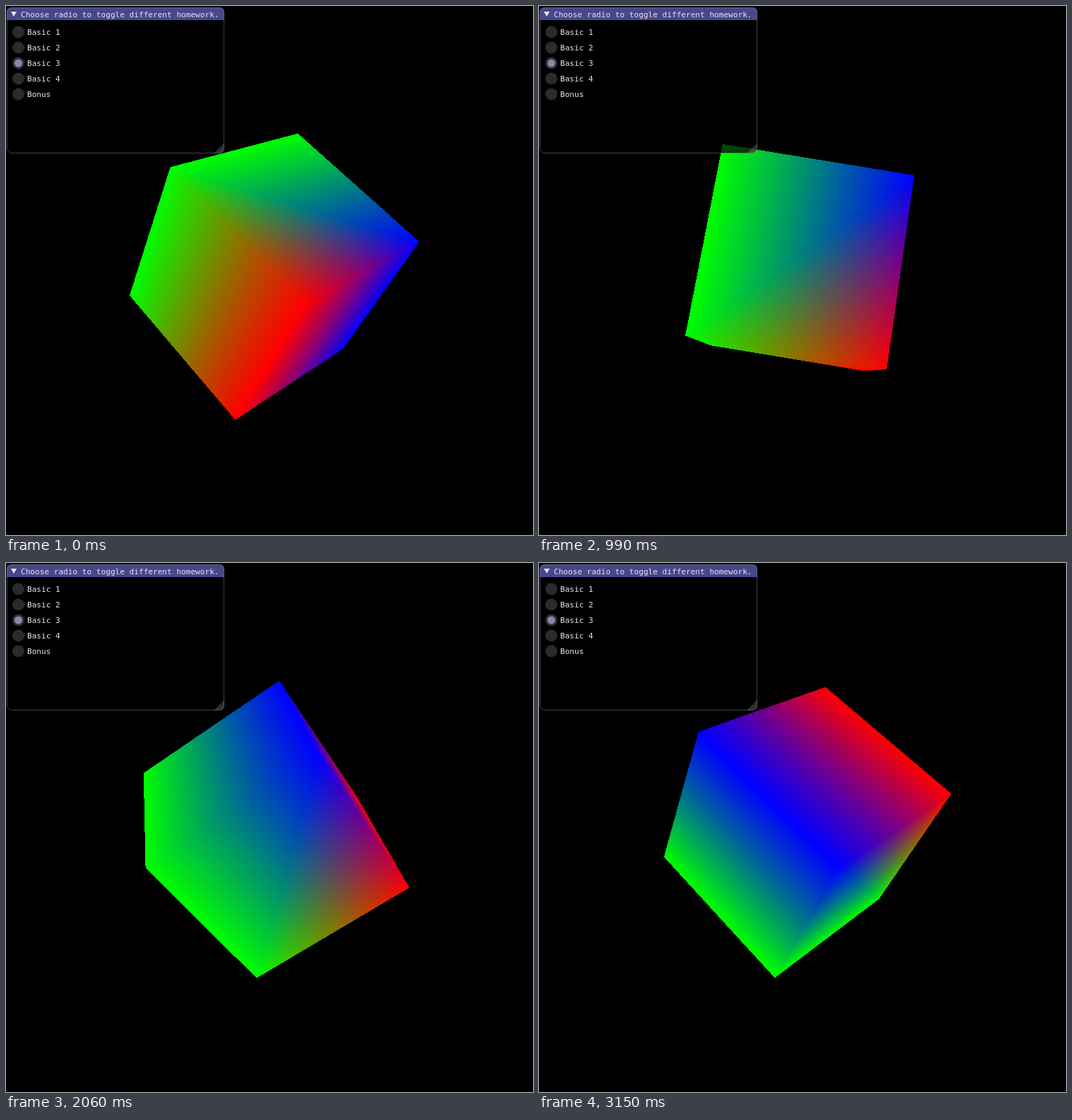
Write an HTML page with a canvas that moves like this. It is 746 px wide and 750 px high and loops after 3.23 s.

```html
<!DOCTYPE html>
<html lang="en">
<head>
<meta charset="utf-8">
<title>Rotating colour cube</title>
<style>
  html, body { margin: 0; width: 100%; height: 100%; overflow: hidden; background: #000; }
  canvas, svg { position: absolute; left: 0; top: 0; }
  text { font: 11.1px "DejaVu Sans Mono", monospace; fill: #e6e6e6; white-space: pre; }
</style>
</head>
<body>
<canvas id="stage" width="746" height="750"></canvas>
<svg id="panel" width="310" height="211">
  <rect x="1.5" y="2.5" width="307" height="206" rx="7" fill="#000" fill-opacity=".72"/>
  <path d="M1 20V9Q1 2 8 2H302Q309 2 309 9V20Z" fill="#47478c"/>
  <path d="M309 194V202Q309 209 302 209H294Z" fill="#fff" fill-opacity=".18"/>
  <rect x="1.5" y="2.5" width="307" height="206" rx="7" fill="none" stroke="#808080" stroke-opacity=".5"/>
  <path d="M7 8H15L11 15Z" fill="#e6e6e6"/>
  <text x="21" y="15.5">Choose radio to toggle different homework.</text>
</svg>
<script>
const W = 746, H = 750, LOOP = 3230, FRAMES = 42;
const ctx = document.getElementById('stage').getContext('2d');
const panel = document.getElementById('panel');

['Basic 1', 'Basic 2', 'Basic 3', 'Basic 4', 'Bonus'].forEach((label, i) => {
  const y = 37 + 22 * i, on = i === 2;
  panel.insertAdjacentHTML('beforeend',
    `<circle cx="17.5" cy="${y}" r="8.5" fill="${on ? '#2f2f3a' : '#2b2b2b'}"/>` +
    (on ? `<circle cx="17.5" cy="${y}" r="5.6" fill="#8b87a3"/>` : '') +
    `<text x="30" y="${y + 4}">${label}</text>`);
});

const corners = {
  A: [-1, -1, 1], B: [-1, -1, -1], C: [1, -1, -1], D: [1, -1, 1],
  E: [-1, 1, 1], F: [1, 1, 1], G: [1, 1, -1], H: [-1, 1, -1]
};
// Clockwise as seen from outside; each is split along its first-third diagonal.
const faces = ['AEFD', 'ADCB', 'DFGC', 'EHGF'];

// Step number and angle in radians
const keys = [[0, -1.255], [9, -.557], [13, -.2325], [19, .2325], [27, .848], [31, 1.163], [41, 1.945]];

function angleAt(step) {
  const i = Math.max(1, keys.findIndex(k => k[0] >= step));
  const [s0, a0] = keys[i - 1], [s1, a1] = keys[i];
  return a0 + (a1 - a0) * (step - s0) / (s1 - s0);
}

const startOf = step => Math.floor((step * 76.66 + (step > 28 ? 10.5 : 0)) / 10) * 10;

function stepAt(ms) {
  let step = FRAMES - 1;
  while (startOf(step) > ms) step--;
  return step;
}

// Turns a corner about the axis (1, 0, 1) and projects it.
function project([x, y, z], angle) {
  const c = Math.cos(angle), s = Math.sin(angle) * Math.SQRT1_2;
  const along = (x + z) / 2 * (1 - c);
  const scale = 918 / (7.5 - (z * c + y * s + along));
  return {
    x: 371 + (x * c - y * s + along) * scale,
    y: 374 - (y * c + (x - z) * s) * scale,
    w: scale,
    channel: x < 0 ? 1 : y < 0 ? 0 : 2
  };
}

const cross = (a, b, x, y) => (b.x - a.x) * (y - a.y) - (b.y - a.y) * (x - a.x);

// Fills a triangle with perspective-correct blending of its corner colours.
function fillTriangle(data, a, b, c) {
  if (cross(a, b, c.x, c.y) <= 0) return;
  const xs = [a.x, b.x, c.x], ys = [a.y, b.y, c.y];
  const left = Math.floor(Math.min(...xs)), right = Math.ceil(Math.max(...xs));
  const top = Math.floor(Math.min(...ys)), bottom = Math.ceil(Math.max(...ys));
  for (let y = top; y < bottom; y++) {
    for (let x = left; x < right; x++) {
      const px = x + .5, py = y + .5;
      let u = cross(b, c, px, py), v = cross(c, a, px, py), w = cross(a, b, px, py);
      if (u < 0 || v < 0 || w < 0) continue;
      u *= a.w; v *= b.w; w *= c.w;
      const unit = 255 / (u + v + w), rgb = [0, 0, 0];
      rgb[a.channel] += u * unit;
      rgb[b.channel] += v * unit;
      rgb[c.channel] += w * unit;
      data.set(rgb, (y * W + x) * 4);
    }
  }
}

function drawCube(angle) {
  const image = ctx.createImageData(W, H);
  for (let i = 3; i < image.data.length; i += 4) image.data[i] = 255;
  for (const face of faces) {
    const [a, b, c, d] = [...face].map(name => project(corners[name], angle));
    fillTriangle(image.data, a, b, c);
    fillTriangle(image.data, a, c, d);
  }
  ctx.putImageData(image, 0, 0);
}

let shown = -1;
const begin = performance.now();

function tick() {
  const step = stepAt((performance.now() - begin) % LOOP);
  if (step !== shown) drawCube(angleAt(shown = step));
  requestAnimationFrame(tick);
}
tick();
</script>
</body>
</html>
```
